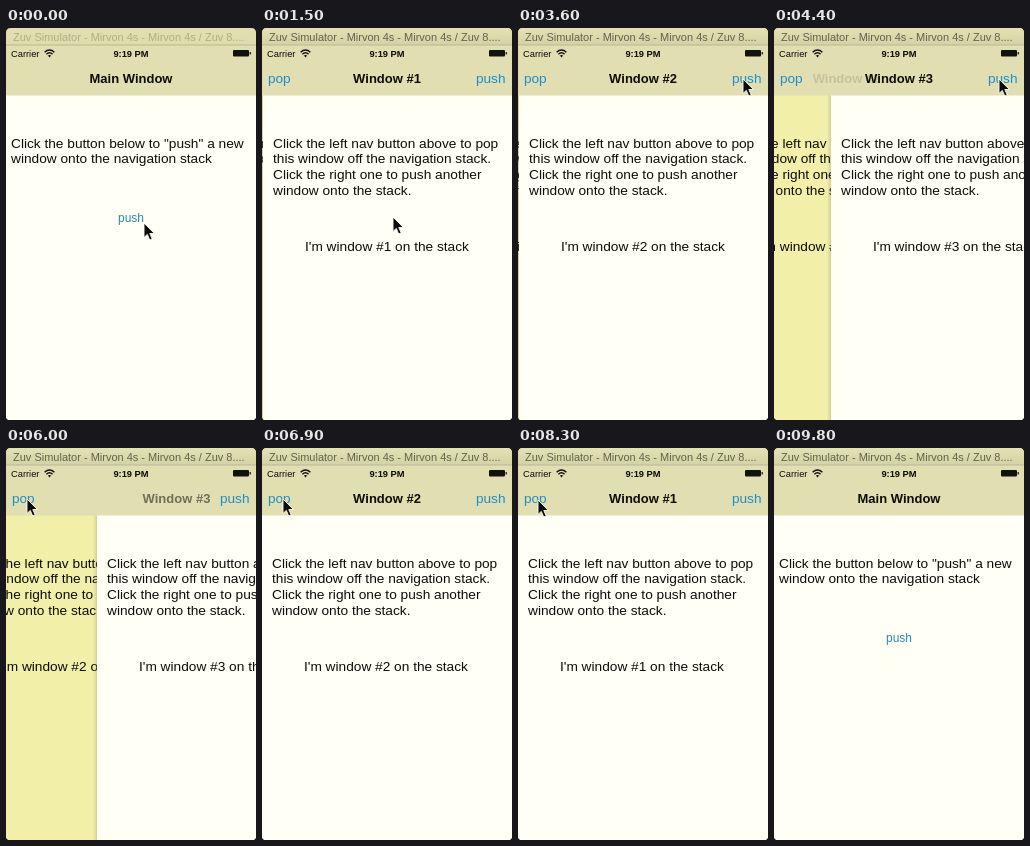
These frames come from a looping animation (250 by 392 pixels, 10000 ms). An HTML page:

```html
<!DOCTYPE html>
<html lang="en">
<head>
<meta charset="utf-8">
<title>Navigation stack</title>
<style>
  html, body { margin: 0; width: 100%; height: 100%; overflow: hidden; background: #1c1c14; }
  svg { display: block; width: 250px; height: 392px; }
  text { font-family: "Liberation Sans", Arial, sans-serif; fill: #0c0c08; white-space: pre; }
  .body { font-size: 13.7px; }
  .title { font-size: 13px; font-weight: bold; text-anchor: middle; }
  .nav { font-size: 13.6px; fill: #1a90cc; }
</style>
</head>
<body>
<svg viewBox="0 0 250 392">
  <defs>
    <clipPath id="frame"><path d="M0 390V5Q0 0 5 0H245Q250 0 250 5V390L248 392H2Z"/></clipPath>
    <linearGradient id="strip" x2="0" y2="1">
      <stop offset="0" stop-color="#e4e1b2"/><stop offset="1" stop-color="#d4d1a6"/>
    </linearGradient>
    <linearGradient id="shade">
      <stop offset="0" stop-color="#8a8660" stop-opacity="0"/>
      <stop offset="1" stop-color="#8a8660" stop-opacity=".3"/>
    </linearGradient>
  </defs>
  <g clip-path="url(#frame)">
    <g id="pages"></g>
    <rect width="250" height="67.5" fill="#e1deb1"/>
    <rect id="bar" width="250" height="17" fill="url(#strip)"/>
    <rect y="16.5" width="250" height="1" fill="#bcb898"/>
    <text id="caption" x="7" y="13" font-size="11">Zuv Simulator - Mirvon 4s - Mirvon 4s / Zuv 8....</text>

    <text x="5" y="28.5" font-size="9.3">Carrier</text>
    <g fill="none" stroke="#12120c" stroke-width="1.5">
      <path d="M38.6 24.2Q43.5 19.8 48.4 24.2M40.4 26.2Q43.5 23.4 46.6 26.2"/>
      <path d="M43.5 29.4L41.9 27.6Q43.5 26.4 45.1 27.6Z" fill="#12120c" stroke="none"/>
    </g>
    <text x="125" y="28.5" font-size="9.3" font-weight="bold" text-anchor="middle">9:19 PM</text>
    <rect x="227" y="22" width="16" height="6.5" rx="1" fill="#12120c"/>
    <rect x="243.6" y="24" width="1.2" height="2.5" fill="#12120c"/>

    <g id="titles"></g>
    <g id="buttons">
      <text class="nav" x="6" y="55">pop</text>
      <text class="nav" x="214" y="55">push</text>
    </g>
  </g>
  <path id="cursor" d="M0 0V14.5L3.3 11.4L5.7 17L8.2 15.9L5.8 10.5H10.4Z"
        fill="#0c0c0a" stroke="#fffff0" stroke-width=".9"/>
</svg>
<script>
const LOOP = 10000, W = 250;
const $ = id => document.getElementById(id);
const clamp = v => Math.max(0, Math.min(1, v));

// [start, from level, to level]
const moves = [[960, 0, 1], [3070, 1, 2], [4200, 2, 3], [5910, 3, 2], [6920, 2, 1], [8400, 1, 0]];

// [time, x, y] of the pointer tip
const trail = [
  [0, 138, 195], [100, 138, 195], [200, 137, 195], [1250, 137, 195], [1500, 131, 189],
  [2400, 225, 51], [4700, 225, 51], [5600, 21, 51], [7000, 21, 51], [7300, 20, 52],
  [8800, 20, 52], [9150, 8, -22], [LOOP, 8, -22]
];

function add(parent, tag, attrs, content = "") {
  const el = document.createElementNS("http://www.w3.org/2000/svg", tag);
  for (const k in attrs) el.setAttribute(k, attrs[k]);
  el.textContent = content;
  return parent.appendChild(el);
}

function makePage(level) {
  const g = add($("pages"), "g", {});
  const shade = add(g, "rect", { x: -4, y: 67, width: 4, height: 325, fill: "url(#shade)" });
  const back = add(g, "rect", { y: 67, width: W, height: 325 });
  const lines = level
    ? ["Click the left nav button above to pop", "this window off the navigation stack.",
       "Click the right one to push another", "window onto the stack."]
    : ['Click the button below to "push" a new', "window onto the navigation stack"];
  lines.forEach((s, i) =>
    add(g, "text", { class: "body", x: level ? 10 : 5, y: 119.8 + i * 15.6 }, s));
  if (level) add(g, "text", { class: "body", x: 42, y: 222.5 }, `I'm window #${level} on the stack`);
  else add(g, "text", { x: 112, y: 194, "font-size": 12, style: "fill:#288ca8" }, "push");
  const title = add($("titles"), "text", { class: "title", x: 125, y: 55 },
    level ? `Window #${level}` : "Main Window");
  return { g, shade, back, title };
}
const pages = [0, 1, 2, 3].map(makePage);

const spring = ms => {
  const x = ms * 0.014;
  return ms > 650 ? 1 : 1 - (1 + x) * Math.exp(-x);
};

// Page colour darkens from near white to yellow as it is covered.
const tone = d => {
  const k = d > 0 ? 0.9 * Math.min(1, 0.4 + d) : 0;
  const mix = (a, b) => Math.round(a + (b - a) * k);
  return `rgb(${mix(255, 240)},${mix(255, 237)},${mix(246, 160)})`;
};

const shift = (el, x, y = 0) => el.setAttribute("transform", `translate(${x.toFixed(2)} ${y.toFixed(2)})`);

function place(i, x, dim, shadow) {
  const p = pages[i];
  p.g.style.display = "";
  shift(p.g, x);
  p.back.setAttribute("fill", tone(dim));
  p.shade.style.display = shadow ? "" : "none";
}

function setTitle(i, x, alpha) {
  const el = pages[i].title;
  el.style.display = alpha > 0 ? "" : "none";
  el.style.opacity = alpha;
  shift(el, x);
}

function pointer(t) {
  const i = Math.max(1, trail.findIndex(k => k[0] > t));
  const [t0, x0, y0] = trail[i - 1], [t1, x1, y1] = trail[i];
  const u = clamp((t - t0) / (t1 - t0)), e = u * u * (3 - 2 * u);
  shift($("cursor"), x0 + (x1 - x0) * e, y0 + (y1 - y0) * e);
}

function draw(t) {
  const [start, from, to] = moves.filter(m => m[0] <= t).pop() || [-LOOP, 1, 0];
  const p = spring(t - start), push = to > from;
  const cover = push ? p : 1 - p;
  const under = Math.min(from, to), over = Math.max(from, to);
  const fade = Math.pow(1 - p, 1.4);

  pages.forEach((q, i) => { q.g.style.display = "none"; setTitle(i, 0, 0); });
  if (cover < 1) place(under, -75 * cover, cover, false);
  if (cover > 0) place(over, Math.round(W * (1 - cover)), 0, cover < 1);

  if (push) {
    setTitle(from, -68 * p, fade);
    setTitle(to, 0, 1);
  } else {
    setTitle(from, 125 * p, fade);
    setTitle(to, -68 * (1 - p), clamp((p - 0.4) / 0.6));
  }
  $("buttons").style.opacity = under ? 1 : cover;
  $("caption").style.fill = t < 100 ? "#b3ae86" : "#63614f";
  $("bar").style.opacity = t < 100 ? 0.25 : 1;
  pointer(t);
}

function tick() {
  draw(performance.now() % LOOP);
  requestAnimationFrame(tick);
}
tick();
</script>
</body>
</html>
```
